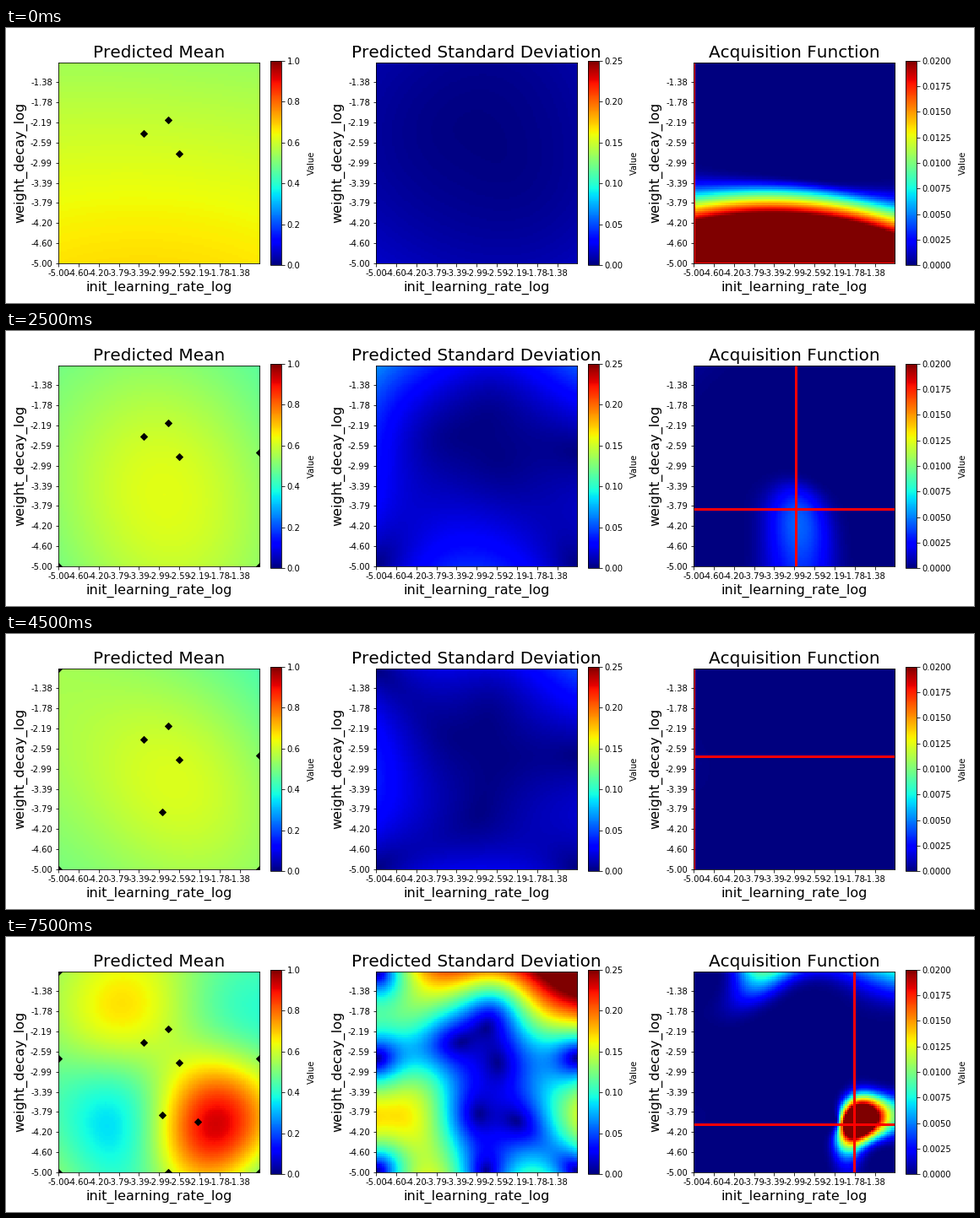
A matplotlib script that plays this animation: 1146 by 326 pixels, repeating every 8000 ms.

```python
import math

import numpy as np
import matplotlib.pyplot as plt
from matplotlib.animation import FuncAnimation

plt.rcParams["font.family"] = "DejaVu Sans"
plt.rcParams["text.kerning_factor"] = 6
W, H, DPI = 1146, 326, 72
N = 100
STD_MAX, ACQ_MAX = 0.25, 0.02

# Sampled positions in grid cells; each step adds one and points at the next.
SAMPLES = np.array([
    (54, 70.7), (42, 64), (59.5, 54), (0, 0), (99, 0), (99, 56.2),
    (50.9, 28.4), (0, 99), (0, 56), (54, 0), (68.7, 25), (79.5, 24),
])
SCORES = np.array([.585, .5965, .6095, .5, .53, .52, .605, .55, .5, .595, .88])
FIRST, STEPS = 3, 9
PRIOR, NOISE, MARGIN = .5, 1e-4, .02

u, v = np.meshgrid(np.linspace(0, 1, N), np.linspace(0, 1, N))
CELLS = np.column_stack([u.ravel(), v.ravel()])
erf = np.vectorize(math.erf)


def kernel(a, b, length):
    dist2 = ((a[:, None] - b[None]) ** 2).sum(axis=2)
    return np.exp(-dist2 / (2 * length ** 2))


def hyperparameters(step):
    """Kernel length and amplitude: slow drift, then the last score shocks."""
    keys = (0, 2, 7, 8)
    length = np.interp(step, keys, (1.5, .72, .45, .3))
    amplitude = np.interp(step, keys, (.3, .7, .36, 1.35))
    return length, amplitude * STD_MAX


def gaussian_process(step):
    """Predicted mean, standard deviation and expected improvement."""
    count = FIRST + step
    length, amplitude = hyperparameters(step)
    points, scores = SAMPLES[:count] / (N - 1), SCORES[:count]
    cross = kernel(points, CELLS, length)
    gram = kernel(points, points, length) + NOISE * np.eye(count)
    weights = np.linalg.solve(gram, cross)
    mean = PRIOR + (scores - PRIOR) @ weights
    variance = 1 - (cross * weights).sum(axis=0)
    std = amplitude * np.sqrt(np.clip(variance, 1e-8, None))

    gain = mean - scores.max() - MARGIN
    z = gain / std
    density = np.exp(-z ** 2 / 2) / math.sqrt(2 * math.pi)
    improvement = gain * (1 + erf(z / math.sqrt(2))) / 2 + std * density
    return [field.reshape(N, N) for field in (mean, std, improvement)]


FIELDS = [gaussian_process(step) for step in range(STEPS)]

fig = plt.figure(figsize=(W / DPI, H / DPI), dpi=DPI, facecolor="white")


def axes_px(left, top, width, height):
    return fig.add_axes((left / W, 1 - (top + height) / H,
                         width / W, height / H))


def panel(left, title, vmax, tick_step, decimals):
    ax = axes_px(left, 40.6, 238.4, 238.4)
    image = ax.imshow(np.zeros((N, N)), cmap="jet", vmin=0, vmax=vmax,
                      origin="lower", extent=(0, N, 0, N), aspect="auto",
                      interpolation="nearest")
    ticks = np.arange(0, N, 10)
    labels = [f"{-5 + .0402 * t:.2f}" for t in ticks]
    ax.set_xticks(ticks, labels)
    ax.set_yticks(ticks, labels)
    ax.set_title(title, fontsize=20)
    ax.set_xlabel("init_learning_rate_log", fontsize=16)
    ax.set_ylabel("weight_decay_log", fontsize=16)
    ax.set_autoscale_on(False)

    bar = fig.colorbar(image, cax=axes_px(left + 251.4, 38.8, 12.2, 242.4))
    levels = np.linspace(0, vmax, round(vmax / tick_step) + 1)
    bar.set_ticks(levels, labels=[f"{x:.{decimals}f}" for x in levels])
    bar.set_label("Value", labelpad=8)
    return ax, image


mean_ax, mean_im = panel(62, "Predicted Mean", 1, .2, 1)
_, std_im = panel(438, "Predicted Standard Deviation", STD_MAX, .05, 2)
acq_ax, acq_im = panel(814, "Acquisition Function", ACQ_MAX, .0025, 4)
images = (mean_im, std_im, acq_im)

markers, = mean_ax.plot([], [], "D", color="black", markersize=5)
cross_v = acq_ax.axvline(0, color="red", linewidth=3)
cross_h = acq_ax.axhline(0, color="red", linewidth=3)


def update(frame):
    step = (frame + 1) // 2
    for image, field in zip(images, FIELDS[step]):
        image.set_data(field)
    markers.set_data(*(SAMPLES[:FIRST + step].T * N / (N - 1)))
    x, y = SAMPLES[FIRST + step]
    cross_v.set_xdata([x, x])
    cross_h.set_ydata([y, y])
    return *images, markers, cross_v, cross_h


anim = FuncAnimation(fig, update, frames=16, interval=500, repeat=True,
                     repeat_delay=0, blit=False)
plt.show()
```
